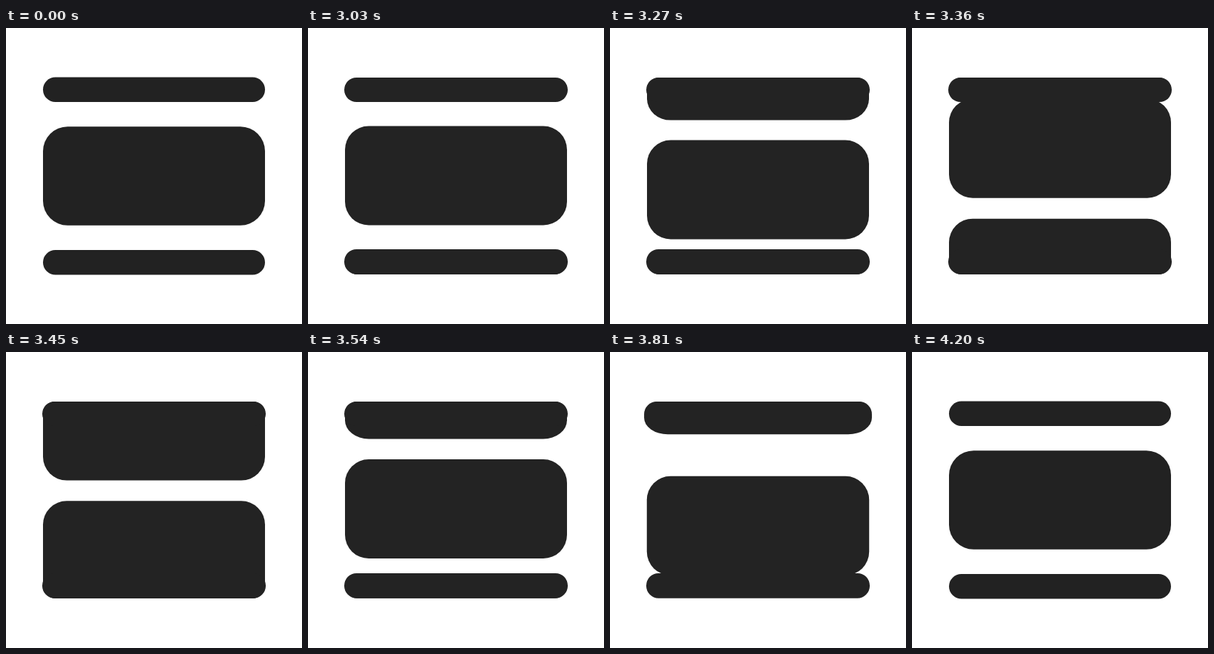
These frames come from a looping animation (400 by 400 pixels, 4.26 s). An HTML page with a canvas:

```html
<!DOCTYPE html>
<html lang="en">
<head>
<meta charset="utf-8">
<title>Carousel icon</title>
<style>
  html, body { margin: 0; width: 100%; height: 100%; overflow: hidden; background: #fff; }
  canvas { display: block; }
</style>
</head>
<body>
<canvas id="stage" width="400" height="400"></canvas>
<script>
const ctx = document.getElementById('stage').getContext('2d');

const LOOP = 4260, START = 3030, SETTLED = 4200, TICK = 30;
const TOP = 67, BOTTOM = 332.7;              // visible window of the scroll
const BELOW = 299, CENTER = 132.5, ABOVE = -34;
const TRAVEL = BELOW - CENTER, CARD_HEIGHT = 134;
const LAST_STEP = 533;

const linear = u => u;
const easeIn = u => u ** 1.5;
const easeOut = u => 1 - (1 - u) ** 2.5;

// Each card: moves of [start, end, from, to, easing]
const cards = [
  [[0, 267, CENTER, ABOVE, easeIn]],
  [[0, 271, BELOW, CENTER, linear], [271, 538, CENTER, ABOVE, linear]],
  [[264, 530, BELOW, CENTER, linear], [530, 798, CENTER, ABOVE, linear]],
  [[LAST_STEP, 1067, BELOW, CENTER, easeOut]]
];

function cardY(moves, t) {
  const [start, end, from, to, ease] = moves.find(m => t < m[1]) || moves[moves.length - 1];
  const u = Math.min(1, Math.max(0, (t - start) / (end - start)));
  return from + (to - from) * ease(u);
}

function bar(x, y, w, h, r) {
  ctx.beginPath();
  ctx.roundRect(x, y, w, h, r);
  ctx.fill();
}

function drawCard(y, bulge) {
  const top = Math.max(y, TOP);
  const bottom = Math.min(y + CARD_HEIGHT, BOTTOM);
  const height = bottom - top;
  if (height <= 0) return;
  const corner = clipped => {
    const r = clipped ? 17 : 32;
    return { x: r, y: Math.min(r, height / 2) };
  };
  const a = corner(y < TOP), b = corner(y + CARD_HEIGHT > BOTTOM);
  ctx.beginPath();
  ctx.roundRect(50 - bulge, top, 300 + 2 * bulge, height, [a, a, b, b]);
  ctx.fill();
}

function drawRest() {
  ctx.fillStyle = '#222';
  bar(50, 66.5, 300, 33.5, 16.7);
  bar(50, 133.3, 300, 133.4, 33.3);
  bar(50, 300, 300, 33.5, 16.7);
}

function drawScroll(t) {
  ctx.fillStyle = '#232323';
  for (const moves of cards) {
    const y = cardY(moves, t);
    const away = Math.abs(y - CENTER) / TRAVEL;
    const bulge = t > LAST_STEP ? 7 * Math.sin(Math.PI * away ** 3) : 0;
    drawCard(y, Math.max(0, bulge));
  }
  bar(49, TOP, 302, 33, 16.5);
  bar(49, BELOW, 302, BOTTOM - BELOW, 16.5);
}

function render(now) {
  const time = now % LOOP;
  ctx.fillStyle = '#fff';
  ctx.fillRect(0, 0, 400, 400);
  if (time < START || time >= SETTLED) drawRest();
  else drawScroll(Math.floor((time - START) / TICK) * TICK);
}

let origin = null;
function loop(now) {
  if (origin === null) origin = now;
  render(now - origin);
  requestAnimationFrame(loop);
}
render(0);
requestAnimationFrame(loop);
</script>
</body>
</html>
```
